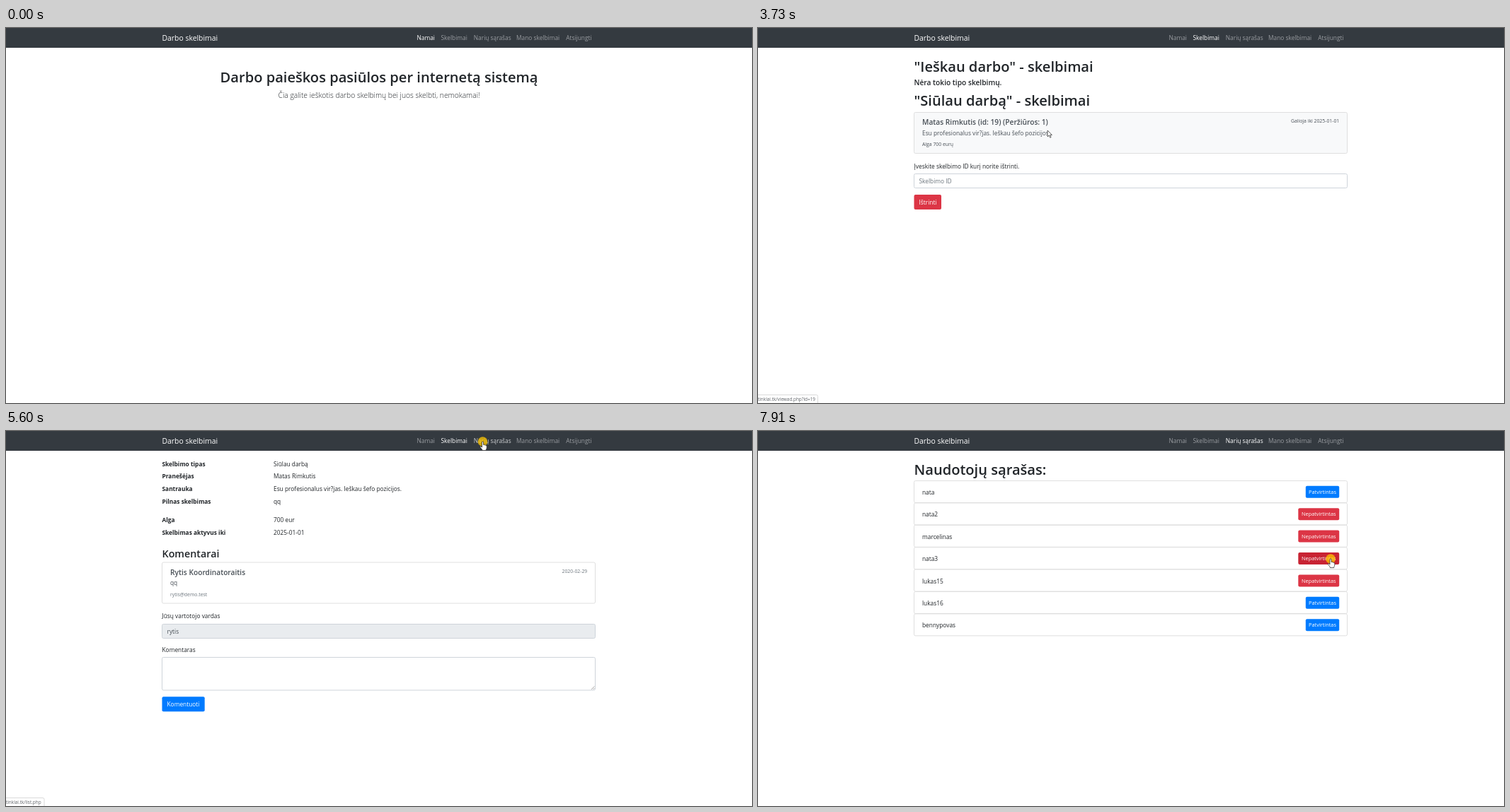
An HTML page for the animation above (7990 ms loop, 1054 by 531 pixels).

```html
<!DOCTYPE html>
<html lang="lt">
<head>
<meta charset="utf-8">
<title>Darbo skelbimai</title>
<style>
html, body { margin: 0; width: 100%; height: 100%; overflow: hidden; background: #fff; }
svg { display: block; width: 1054px; height: 531px; font-family: "Open Sans", "Noto Sans", sans-serif; }
text { white-space: pre; }
</style>
</head>
<body>
<svg id="stage" viewBox="0 0 1054 531"></svg>
<script>
const LOOP = 7990, DARK = '#212529', SLATE = '#495057', GRAY = '#6c757d', BLUE = '#007bff', RED = '#dc3545';
const BODY = 8.35, STEP = 31.4;
const $ = id => document.getElementById(id);

const text = (x, y, s, size = BODY, { w = 400, c = DARK, a = 'start', id = '' } = {}) =>
  `<text id="${id}" x="${x}" y="${y}" font-size="${size}" font-weight="${w}" fill="${c}" text-anchor="${a}">${s}</text>`;
const box = (x, y, w, h, fill = '#fff', stroke = '#dfdfdf', id = '') =>
  `<rect id="${id}" x="${x}" y="${y}" width="${w}" height="${h}" rx="2" fill="${fill}" stroke="${stroke}"/>`;
const field = (y, h, fill) => box(220.5, y, 612, h, fill, '#ced4da');
const card = (y, h, id) => box(220.5, y, 612, h, '#fff', '#dfdfdf', id);
const h1 = (y, s, x = 220.5, a) => text(x, y, s, 20.1, { w: 600, a });
const h5 = (x, y, s, c) => text(x, y, s, 10.2, { w: 600, c });
const small = (x, y, s, c, a) => text(x, y, s, 6.87, { c, a });
const button = (y, w, s, c) => box(220.5, y, w, 21, c, 'none') + text(227.5, y + 13.5, s, BODY, { c: '#fff' });

const links = [[580.5, 'Namai'], [614.5, 'Skelbimai'], [660.8, 'Narių sąrašas'], [721, 'Mano skelbimai'], [791.3, 'Atsijungti']];
const nav = '<rect width="1054" height="28" fill="#343a40"/>' +
  text(220.5, 17.6, 'Darbo skelbimai', 10.4, { c: '#fff' }) +
  links.map(([x, s], i) => text(x, 16.7, s, BODY, { id: 'link' + i })).join('');

const home = h1(77, 'Darbo paieškos pasiūlos per internetą sistemą', 527, 'middle') +
  text(527, 98.6, 'Čia galite ieškotis darbo skelbimų bei juos skelbti, nemokamai!', 10.3, { w: 300, a: 'middle' });

const ads = h1(62, '"Ieškau darbo" - skelbimai') + h5(220.5, 81.2, 'Nėra tokio tipo skelbimų.') +
  h1(110, '"Siūlau darbą" - skelbimai') + card(119.5, 58, 'offer') +
  h5(232, 137, 'Matas Rimkutis (id: 19) (Peržiūros: 1)', SLATE) +
  text(232, 151.6, 'Esu profesionalus vir?jas. Ieškau šefo pozicijos.', BODY, { c: SLATE }) +
  small(232, 167, 'Alga 700 eurų', SLATE) + small(821.3, 134.4, 'Galioja iki 2025-01-01', SLATE, 'end') +
  text(220.5, 198.5, 'Įveskite skelbimo ID kurį norite ištrinti.') +
  field(206.5, 20) + text(227.5, 220.4, 'Skelbimo ID', BODY, { c: GRAY }) + button(236, 38.5, 'Ištrinti', RED);

const rows = [[49.6, 'Skelbimo tipas', 'Siūlau darbą'], [67.2, 'Pranešėjas', 'Matas Rimkutis'],
  [84.9, 'Santrauka', 'Esu profesionalus vir?jas. Ieškau šefo pozicijos.'], [102.5, 'Pilnas skelbimas', 'qq'],
  [129, 'Alga', '700 eur'], [146.6, 'Skelbimas aktyvus iki', '2025-01-01']];
const detail = rows.map(([y, k, v]) => text(220.5, y, k, BODY, { w: 700 }) + text(378, y, v)).join('') +
  text(220.5, 178.6, 'Komentarai', 14.3, { w: 600 }) + card(186, 58) +
  h5(232, 203.8, 'Rytis Koordinatoraitis', SLATE) + text(232, 218.4, 'qq', BODY, { c: SLATE }) +
  small(232, 233.6, 'rytis@demo.test', GRAY) + small(821.3, 201.2, '2020-02-29', GRAY, 'end') +
  text(220.5, 265, 'Jūsų vartotojo vardas') + field(273.5, 20, '#e9ecef') + text(227.5, 287, 'rytis', BODY, { c: SLATE }) +
  text(220.5, 312.6, 'Komentaras') + field(320.5, 46.5) +
  '<path d="M827 366l4.5-4.5M829.5 366l2-2" stroke="#888" stroke-width=".7"/>' + button(376.3, 60.2, 'Komentuoti', BLUE);

const people = ['nata', 'nata2', 'marcelinas', 'nata3', 'lukas15', 'lukas16', 'bennypovas'];
const badge = (i, ok) => {
  const id = (ok ? 'on' : 'off') + i, y = i * STEP, w = ok ? 47.4 : 57.9;
  return `<g id="${id}">` + box(821.2 - w, 77.8 + y, w, 17, ok ? BLUE : RED, 'none', id + 'fill') +
    text(821.2 - w / 2, 89 + y, ok ? 'Patvirtintas' : 'Nepatvirtintas', 7.35, { c: '#fff', a: 'middle' }) + '</g>';
};
const list = h1(62, 'Naudotojų sąrašas:') + people.map((name, i) =>
  card(70.5 + i * STEP, 31) + text(232, 90 + i * STEP, name) +
  (i == 4 ? badge(i, true) + badge(i, false) : badge(i, i == 0 || i > 4))).join('');

const pages = { home, ads, detail, list };
$('stage').innerHTML = nav +
  Object.entries(pages).map(([id, body]) => `<g id="${id}">${body}</g>`).join('') +
  '<g id="status">' + box(-2, 519.5, 56, 14, '#fff', '#dadada', 'statusBox') + text(0, 528.2, '', 6.4, { c: '#5f6368', id: 'statusText' }) + '</g>' +
  `<g id="cursor"><circle id="click" r="6.8" fill="#ffc800" fill-opacity=".75"/>
  <path id="arrow" d="M0 0V9L2.1 7.1 3.6 10.3 5 9.7 3.6 6.5H6.3Z" fill="#fff" stroke="#222" stroke-width=".7"/>
  <path id="hand" d="M-1 1Q-1 0 0 0T1 1V4.5Q2.4 3.9 2.8 5 4.2 4.5 4.5 5.6 5.8 5.4 5.8 6.6V9Q5.5 10.6 4.8 11.3V12.6H-.8V11.3L-3.7 7.8Q-3.9 6.4-2.6 6.7L-1 8Z" fill="#fff" stroke="#222" stroke-width=".7"/></g>`;

// [time, x, y]; the pointer glides between neighbouring points
const path = [[70, 947, 498], [150, 763, 286], [540, 640, 7], [620, 630, 12], [1000, 630.5, 14], [1150, 629, 16],
  [1930, 629, 16], [2100, 428, 154.5], [2330, 424, 151], [3410, 424, 151], [3730, 409, 145], [4200, 440, 125],
  [4280, 440, 125], [4890, 643, 15.5], [5290, 643, 15.5], [5520, 673.5, 15], [5910, 673.5, 15], [6210, 572.5, 91],
  [6670, 809, 209], [7430, 809, 209], [7660, 809, 181]];
const place = t => {
  const i = path.findIndex(p => p[0] > t);
  if (i < 1) return path[i < 0 ? path.length - 1 : 0];
  const [a, b] = [path[i - 1], path[i]], k = (t - a[0]) / (b[0] - a[0]);
  return a.map((v, j) => v + (b[j] - v) * k);
};

const during = (t, ...spans) => spans.some(([a, b]) => t >= a && t < b);
const show = (id, on) => $(id).style.display = on ? '' : 'none';
const fill = (id, c) => $(id).setAttribute('fill', c);
const mix = (a, b, k) => `rgb(${a.map((v, i) => v + (b[i] - v) * Math.min(1, Math.max(0, k)))})`;
const red = [220, 53, 69], darkRed = [200, 35, 51], blue = [0, 123, 255], darkBlue = [0, 105, 217];

function draw(t) {
  const page = t < 1780 ? 'home' : t < 3810 ? 'ads' : t < 5910 ? 'detail' : 'list';
  for (const id in pages) show(id, id == page);

  const active = { home: 0, ads: 1, detail: 1, list: 2 }[page];
  const hover = during(t, [540, 1930]) ? 1 : during(t, [5440, 6000]) ? 2 : -1;
  links.forEach((_, i) => fill('link' + i, i == active ? '#fff' : i == hover ? '#ccced0' : '#999ca0'));

  const file = during(t, [770, 2000], [4810, 5440]) ? 'ads.php'
    : during(t, [2480, 3890]) ? 'viewad.php?id=19' : during(t, [5440, 6060]) ? 'list.php' : '';
  show('status', file);
  $('statusText').textContent = 'tinklai.tk/' + file;
  $('statusBox').setAttribute('width', file.length > 9 ? 86.5 : 56);

  fill('offer', t > 2050 ? '#f8f9fa' : '#fff');
  show('on4', t < 7360);
  show('off4', t >= 7360);
  fill('on4fill', mix(blue, darkBlue, (t - 6670) / 150));
  fill('off4fill', mix(darkRed, red, (t - 7510) / 150));
  fill('off3fill', mix(red, darkRed, (t - 7590) / 150));

  const [, x, y] = place(t);
  const hand = during(t, [770, 1930], [2050, 3650], [4810, 5210], [5440, 5980], [6670, LOOP]);
  $('cursor').setAttribute('transform', `translate(${x} ${y})`);
  show('cursor', during(t, [70, 220], [540, LOOP]));
  show('hand', hand);
  show('arrow', !hand);
  show('click', during(t, [1380, 1550], [3410, 3570], [5600, 5750], [7060, 7210], [7830, LOOP]));
}

const start = performance.now();
(function tick() {
  draw((performance.now() - start) % LOOP);
  requestAnimationFrame(tick);
})();
</script>
</body>
</html>
```
